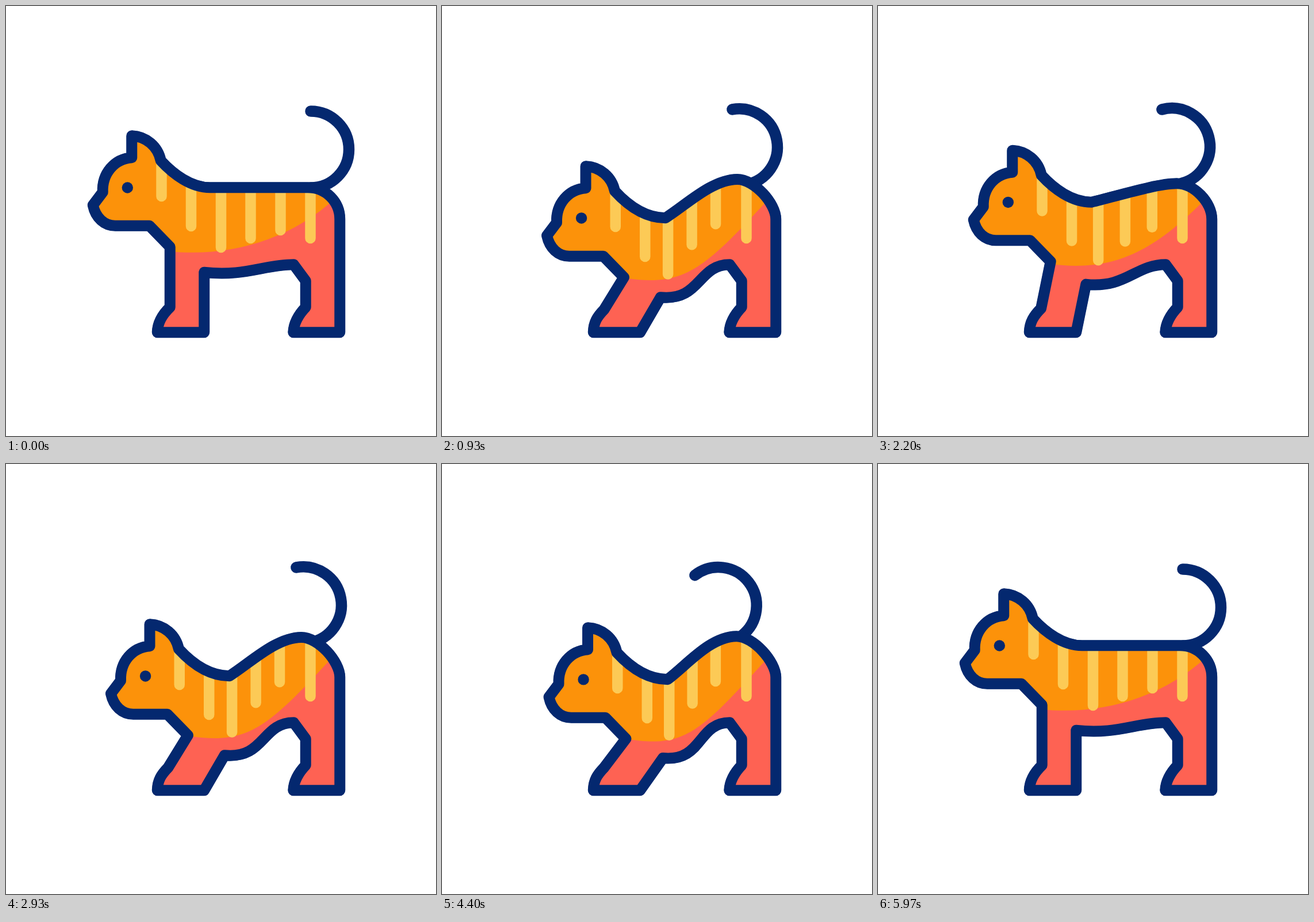
An HTML page with a canvas for the animation above (6 s loop, 748x748 px).

```html
<!DOCTYPE html>
<html lang="en">
<head>
<meta charset="utf-8">
<title>Stretching cat</title>
<style>
  html, body { margin: 0; width: 100%; height: 100%; overflow: hidden; background: #fff; }
  canvas { display: block; width: 748px; height: 748px; }
</style>
</head>
<body>
<canvas id="stage" width="748" height="748"></canvas>
<script>
const ctx = document.getElementById('stage').getContext('2d');
const NAVY = '#04286f', ORANGE = '#fc920a', YELLOW = '#fcca56', CORAL = '#fe6253';
const LINE = 18.5, OUTER_LINE = 19.5;
const LOOP = 6000, CYCLE = 2000;

// x, bottom, and how far each stripe moves at full crouch
const STRIPES = [
  [270.5, 331, 36, 61],
  [322, 383, 36, 61],
  [374, 420, 22, 53.5],
  [425.5, 404, 10.5, 13],
  [477.5, 390, -1.7, -12.5],
  [529.5, 404, 0, 0]
];

const clamp = v => Math.min(1, Math.max(0, v));
const ease = (t, from, to) => {
  const s = clamp((t - from) / (to - from));
  return s * s * (3 - 2 * s);
};

// 25 poses a second shown on a 30 Hz clock: every sixth tick repeats
function poseTime(ms) {
  const tick = Math.floor(ms * 0.03 + 0.11);
  return (Math.floor(tick / 6) * 5 + Math.max(0, tick % 6 - 1)) * 40;
}

// Body outline for crouch amount p (0 standing, 1 lowest)
function bodyPath(p) {
  const path = new Path2D();
  const hx = 36 * p, hy = 61 * p;
  const head = (...v) => v.map((n, i) => n + (i % 2 ? hy : hx));
  const humpX = 525 - 13 * p, humpY = 316 - 16.5 * p;

  path.moveTo(...head(219, 226));
  path.bezierCurveTo(...head(243, 227, 264, 244, 269, 269));
  path.bezierCurveTo(...head(291, 293, 322, 316), 355 + 39 * p, 316 + hy);
  path.bezierCurveTo(410 + 17 * p, 316 + 35 * p, 498 - 33 * p, 316 - 16 * p, humpX, humpY);
  path.bezierCurveTo(humpX + 31 - 2 * p, humpY, 580.5, 340 + 4 * p, 580.5, 371);

  // hind leg
  path.lineTo(580.5, 567.5);
  path.lineTo(500, 567.5);
  path.bezierCurveTo(501, 551, 508, 538, 521.5, 524);
  path.lineTo(521.5, 478);
  path.lineTo(500.5, 449.5);

  // belly
  path.bezierCurveTo(450 - 6 * p, 449.5, 415 + 40 * p, 471 + 49 * p,
    344.5 + 41 * p, 463 + 50 * p);

  // front leg
  path.lineTo(344.5, 567.5);
  path.lineTo(263.5, 567.5);
  path.bezierCurveTo(264, 550, 272 - 2 * p, 537 + 4 * p, 285.5 - 4 * p, 524 + 5 * p);
  path.lineTo(...head(285.5, 419));

  // chin, nose and forehead
  path.lineTo(...head(249.5, 382));
  path.lineTo(...head(190, 382));
  path.bezierCurveTo(...head(171, 382, 156, 368, 151.5, 346.5));
  path.lineTo(...head(168.5, 324));
  path.bezierCurveTo(...head(167, 291, 189, 266, 219, 264));
  path.closePath();
  return path;
}

function drawTail(angle) {
  const px = 500.4, py = 319.6;
  ctx.save();
  ctx.translate(px, py);
  ctx.rotate(-angle * Math.PI / 180);
  ctx.beginPath();
  ctx.arc(530 - px, 249.5 - py, 66.5, -Math.PI / 2, Math.PI / 2);
  ctx.stroke();
  ctx.restore();
}

function drawCoat(p) {
  ctx.fillStyle = CORAL;
  ctx.fillRect(100, 150, 550, 450);

  ctx.fillStyle = ORANGE;
  ctx.beginPath();
  ctx.moveTo(285 + 36 * p, 427 + 53 * p);
  ctx.bezierCurveTo(390 + 34 * p, 437 + 59 * p, 494 - 50 * p, 407 + 66 * p, 572, 335 - 4 * p);
  ctx.lineTo(600, 200);
  ctx.lineTo(100, 200);
  ctx.lineTo(100, 427 + 53 * p);
  ctx.fill();

  ctx.lineWidth = LINE;
  ctx.strokeStyle = YELLOW;
  for (const [x, y, dx, dy] of STRIPES) {
    const sx = x + dx * p;
    ctx.beginPath();
    ctx.moveTo(sx, 200);
    ctx.lineTo(sx, y + dy * p);
    ctx.stroke();
  }
}

function draw(ms) {
  const t = poseTime(ms) % CYCLE;
  const crouch = ease(t, 0, 450) - ease(t, 808, 1300);
  const swing = 42.3 * (ease(t, 0, 500) - ease(t, 500, 1120));
  const body = bodyPath(crouch);

  ctx.fillStyle = '#fff';
  ctx.fillRect(0, 0, 748, 748);
  ctx.lineCap = ctx.lineJoin = 'round';

  // the outer edge is slightly heavier than the inner one
  ctx.strokeStyle = NAVY;
  ctx.lineWidth = OUTER_LINE;
  drawTail(swing);
  ctx.stroke(body);

  ctx.save();
  ctx.clip(body);
  drawCoat(crouch);
  ctx.restore();

  ctx.strokeStyle = ctx.fillStyle = NAVY;
  ctx.lineWidth = LINE;
  ctx.stroke(body);
  ctx.beginPath();
  ctx.arc(211.3 + 36 * crouch, 316 + 61 * crouch, 9.7, 0, Math.PI * 2);
  ctx.fill();
}

const start = performance.now();
function frame() {
  draw((performance.now() - start) % LOOP);
  requestAnimationFrame(frame);
}
frame();
</script>
</body>
</html>
```
